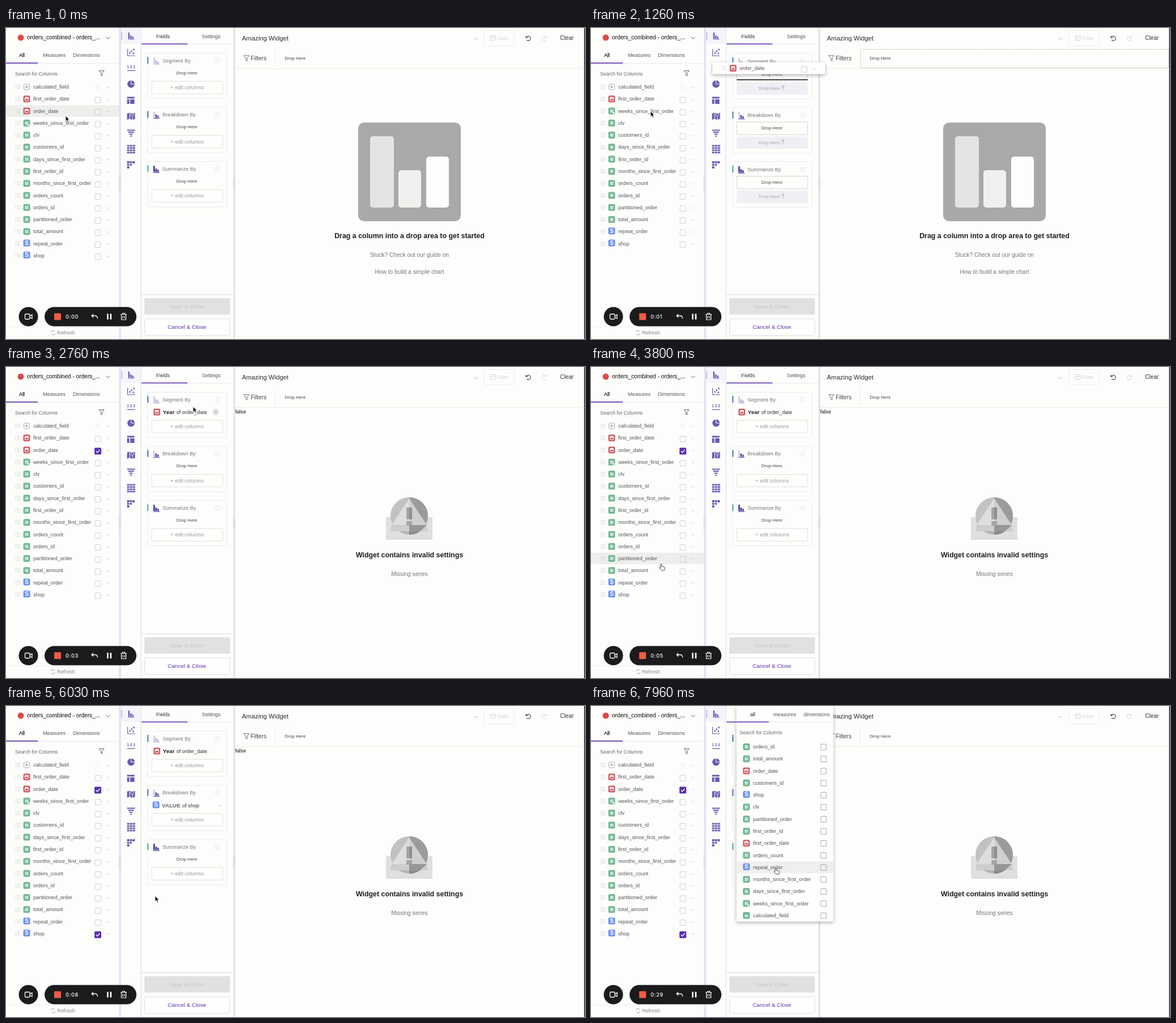
Recreate the animation shown at these times as an HTML page. Size 1021x549 px, loop 8 s.

```html
<!DOCTYPE html>
<html lang="en">
<head>
<meta charset="utf-8">
<title>Widget builder</title>
<style>
  html, body { margin: 0; width: 100%; height: 100%; overflow: hidden; background: #fdfdfb; }
  svg { display: block; width: 100%; height: 100%; font-family: "Liberation Sans", Arial, sans-serif; }
  .float { filter: drop-shadow(0 2px 3px rgba(0, 0, 0, .3)); }
  .timer { font: 500 9.2px Inter, sans-serif; letter-spacing: .6px; }
</style>
</head>
<body>
<svg viewBox="0 0 1021 549">
  <g id="base"></g>
  <g id="live"></g>
</svg>
<script>
const LOOP = 8000, ROW = 21.27, PURPLE = '#5b2fae', ICON = '#6a5bb0';
const DRAG_START = 350, DROP = 1950, SHOP_ADDED = 4930, SHOP_CHECKED = 5130, MENU_OPEN = 6934;
const BLUE = '#6d93f0', GREEN = '#74b897', RED = '#cf616b';

const columns = ['calculated_field', 'first_order_date', 'order_date', 'weeks_since_first_order', 'clv',
  'customers_id', 'days_since_first_order', 'first_order_id', 'months_since_first_order', 'orders_count',
  'orders_id', 'partitioned_order', 'total_amount', 'repeat_order', 'shop'];
const menuColumns = ['orders_id', 'total_amount', 'order_date', 'customers_id', 'shop', 'clv',
  'partitioned_order', 'first_order_id', 'first_order_date', 'orders_count', 'repeat_order',
  'months_since_first_order', 'days_since_first_order', 'weeks_since_first_order', 'calculated_field'];

// Key lists hold [time, x, y]; values ease from one key to the next.
const cursorKeys = [[0, 105, 155], [300, 105, 155], [700, 105, 147], [2529, 105, 147], [2530, 316, 62],
  [2760, 330, 70], [3000, 330, 71], [3560, 130, 290], [3800, 123, 347], [4300, 146, 392], [4700, 160, 402],
  [5580, 160, 402], [6360, 327, 294], [7299, 327, 294], [7300, 325, 285]];
const dragKeys = [[DRAG_START, 0, 0], [1100, 214, -76]];
const clockKeys = [[0, 0], [770, 1], [1700, 2], [2460, 3], [3200, 4], [3700, 5], [4300, 6], [4900, 7], [6000, 8], [7300, 29]];

const clamp = v => Math.max(0, Math.min(1, v));
const mix = (a, b, p) => a + (b - a) * p;

function track(keys, t) {
  const next = keys.findIndex(k => k[0] > t);
  if (next < 0) return keys.at(-1).slice(1);
  if (!next) return keys[0].slice(1);
  const [a, b] = [keys[next - 1], keys[next]];
  const p = (t - a[0]) / (b[0] - a[0]), s = p * p * (3 - 2 * p);
  return [mix(a[1], b[1], s), mix(a[2], b[2], s)];
}

// Drawing helpers; text is placed by its vertical centre.
const text = (x, y, s, size = 9.1, fill = '#55555a', extra = '') =>
  `<text x="${x}" y="${y + size * .34}" font-size="${size}" fill="${fill}" ${extra}>${s}</text>`;
const mid = (x, y, s, size, fill, extra = '') => text(x, y, s, size, fill, 'text-anchor="middle" ' + extra);
const rect = (x, y, w, h, fill, r = 0, extra = '') =>
  `<rect x="${x}" y="${y}" width="${w}" height="${h}" rx="${r}" fill="${fill}" ${extra}/>`;
const frame = (x, y, w, h, stroke, r = 2, fill = 'none', extra = '') =>
  rect(x, y, w, h, fill, r, `stroke="${stroke}" ${extra}`);
const path = (d, stroke, width = 1, fill = 'none', extra = '') =>
  `<path d="${d}" stroke="${stroke}" stroke-width="${width}" fill="${fill}" ${extra}/>`;
const shape = (d, fill) => path(d, 'none', 0, fill);
const dot = (x, y, r, fill, extra = '') => `<circle cx="${x}" cy="${y}" r="${r}" fill="${fill}" ${extra}/>`;
const group = (x, y, body, extra = '') => `<g transform="translate(${x} ${y})" ${extra}>${body}</g>`;
const chevron = (x, y, color, s = 2.5) => path(`M${x - s} ${y - s / 2}l${s} ${s}l${s} ${-s}`, color);
const funnel = (x, y, s, color) =>
  path(`M${x - s} ${y - s}h${2 * s}l${-s * .75} ${s * .9}v${s * 1.1}l${-s * .5} ${-s * .3}v${-s * .8}z`, color, .9);
const bold = 'font-weight="bold"';

function typeIcon(x, y, name) {
  const box = color => rect(x - 6, y - 6, 12, 12, color, 2.5);
  if (name.endsWith('_date')) return box(RED) +
    frame(x - 3, y - 3, 6, 6, '#fff', 1) + rect(x - 3, y - 2.5, 6, 2, '#fff');
  if (/^(shop|repeat_order)$/.test(name)) return group(0, -1, box(BLUE) + mid(x, y, 'S', 10, '#fff', bold));
  if (name === 'calculated_field') return box(GREEN) + mid(x, y, 'N', 8, '#fff', bold);
  return box(GREEN) + path(`M${x - 1.3} ${y - 3}v6m2.6 -6v6M${x - 3} ${y - 1.3}h6m-6 2.6h6`, '#fff', .9) +
    (name.startsWith('weeks') ? rect(x + 2, y + 2, 3, 3, '#fff', 1) : '');
}

function checkbox(x, y, checked) {
  return checked
    ? rect(x - 6, y - 6, 12, 12, PURPLE, 1.5) + path(`M${x - 3.3} ${y}l2.4 2.5l4.4 -5`, '#fff', 1.3)
    : frame(x - 5, y - 5, 10, 10, '#cfcfd2', 1);
}

function listRow(name, y, checked) {
  const calculated = name === 'calculated_field';
  return path(`M16 ${y - 3}h2m1 0h6M16 ${y}h2m1 0h6M16 ${y + 3}h2m1 0h6`, '#d2d2d8', .9) +
    (calculated
      ? frame(31.5, y - 5, 10, 10, '#aaaab4', 2) + path(`M34 ${y}h5m-2.5 -2.5v5`, '#8d8d99') +
        dot(162, y, 3.5, 'none', 'stroke="#ececee"')
      : typeIcon(36.5, y, name) + checkbox(162, y + 2, checked)) +
    text(48, y, name) + chevron(180, y + 1, '#cfcfd3');
}

const bars = (x, y, colors) => rect(x - 5, y - 6, 2.4, 11, colors[0]) + rect(x - 1.6, y - 1, 2.4, 6, colors[1]) +
  rect(x + 1.8, y + 1, 2.4, 4, colors[1]) + rect(x - 5, y + 5.5, 11, 1, colors[1]);

function chartIcons() {
  const x = 220.5;
  return rect(204, 0, 33, 28, '#f5f4fb') + rect(203, 7, 2, 14, '#c9c4ea') +
    bars(x, 14, [ICON, ICON]) +
    path(`M${x - 6} 37v12h13`, ICON, 1.2) + [[-2, 44], [1, 41], [4, 45], [5, 38]].map(([d, y]) => dot(x + d, y, 1.4, ICON)).join('') +
    mid(x, 69, '1 2 3', 6.5, ICON, bold) + rect(x - 7, 74.5, 14, 1.3, ICON) +
    dot(x, 99, 6.5, ICON) + path(`M${x} 92v7h7`, '#fdfdfb') +
    rect(x - 7, 121.5, 13, 3, ICON) + rect(x - 7, 126, 4, 8, ICON) + rect(x - 1.5, 126, 7.5, 8, ICON) +
    shape(`M${x - 7} 151l4 -1.5v11l-4 1.5zM${x - 2} 149.5l4 2v10.5l-4 -1.5zM${x + 3} 151.5l4 -2v11l-4 1.5z`, ICON) +
    dot(x + 2, 153, 2.6, ICON, 'stroke="#fdfdfb" stroke-width=".8"') +
    [[7, 179.5], [5, 183], [3, 186.5], [1.3, 190]].map(([w, y]) => rect(x - w, y, 2 * w, 2, ICON)).join('') +
    [207, 211, 215, 219].map(y => rect(x - 7, y - .5, 4, 2.8, ICON) + rect(x - 2.2, y - .5, 4.2, 2.8, ICON) + rect(x + 2.8, y - .5, 4.4, 2.8, ICON)).join('') +
    rect(x - 7, 235, 4, 4, ICON) + rect(x - 2, 235, 3.5, 4, ICON) + rect(x + 2.5, 235, 4, 4, ICON) +
    rect(x - 7, 240, 4, 3, ICON) + rect(x - 2, 240, 3.5, 3, ICON) + rect(x - 7, 244, 4, 4, ICON);
}

const undo = (x, y, color, s = 1) =>
  path('M-4 -4v3.2h3.2M-3.6 -1.2a4 4 0 1 1 .6 4.2', color, 1.2, 'none', `transform="translate(${x} ${y}) scale(${s} 1)"`);

function recorder() {
  return dot(39.5, 509.5, 17, '#1b1b1d') +
    frame(33.5, 505, 8.5, 9, '#fff', 1.5, 'none', 'stroke-width="1.3"') + path('M42 508.5l4 -2.5v7l-4 -2.5', '#fff', 1.2) +
    rect(68, 492.5, 162, 34, '#1b1b1d', 17) + rect(85, 503.5, 12, 12, '#f05c45', 1) +
    path('M154 505l-3 3l3.2 3M151 508h7q3.5 .5 3.5 5', '#fff', 1.3) +
    rect(178, 504.5, 2.6, 10, '#fff') + rect(183.5, 504.5, 2.6, 10, '#fff') +
    path('M202 505.5h11m-7.5 0v-2h4v2M203.5 506v9h8v-9M206 508.5v4m3 -4v4', '#fff', 1.2);
}

function baseScene() {
  const line = '#e9e9ee';
  return rect(0, 0, 1021, 549, '#fdfdfb') +
    // column list header and footer
    dot(26, 17, 5.5, '#dd4b4b') + text(37, 17, 'orders_combined - orders_...', 10.05, '#333', 'stroke="#333" stroke-width=".2"') +
    chevron(180, 17.5, '#555', 3.5) +
    mid(28, 48, 'All', 9.1, '#222', 'stroke="#222" stroke-width=".25"') + text(65, 48, 'Measures') + text(118, 48, 'Dimensions') +
    rect(0, 62, 200, 1, line) + rect(0, 61, 56, 1.6, PURPLE) +
    text(16, 81.5, 'Search for Columns', 8.5, '#66666b') + funnel(168.5, 80, 4.5, '#555') +
    rect(0, 527, 200, 1, '#f0f0f0') + text(90, 538, 'Refresh', 9.1, '#88888d') +
    path('M79.5 537a3.5 3.5 0 0 1 6.5 -1M86.500 539a3.500 3.500 0 0 1 -6.500 1', '#99999e') +
    // dividers
    rect(199, 0, 4, 549, '#e5e3f3') + rect(237, 0, 2, 549, '#ececf1') + rect(401, 0, 3, 549, '#e3e3e3') +
    [200, 402].map(x => path(`M${x - 1} 264v22m3 -22v22`, '#cfcfd6', .7)).join('') +
    rect(1019.5, 0, 1.5, 549, '#222') +
    chartIcons() +
    // field panel
    mid(277, 14.5, 'Fields', 9.1, '#333') + mid(362, 14.5, 'Settings') +
    rect(239, 28, 162, 1, line) + rect(239, 27.500, 81, 1.500, PURPLE) +
    rect(238, 470, 163, 1.5, '#e6e6ea') +
    rect(244, 477, 151, 29, '#e1e1e1', 2) + mid(319, 492, 'Save &amp; Close', 9.9, '#c5c5c5') +
    frame(244.5, 513.5, 150, 29, '#dedee0', 2, '#fefefe') + mid(319, 528, 'Cancel &amp; Close', 9.9, PURPLE) +
    // widget header
    text(416, 18, 'Amazing Widget', 11.3, '#2a2a2a') + chevron(828, 19, '#bbb', 3.5) +
    frame(842.5, 4.5, 54, 27, '#ededed', 2) + frame(854, 13.5, 9, 8, '#d6d6d6', 1) + path('M854 16.5h9', '#d6d6d6') +
    text(866, 18, 'Date', 9.5, '#d8d8d8') +
    undo(921, 18, '#555') + undo(949, 18, '#ddd', -1) + text(977, 18, 'Clear', 10.1, '#333') +
    funnel(424, 53.5, 4.8, '#666') + text(431.5, 53.5, 'Filters', 10.2, '#444') +
    rect(404, 71, 616, 1, '#ebebe6') +
    recorder();
}

function section(i, title, accent, colors, chip, dragging, hover) {
  const y = 44 + 95.6 * i, shift = dragging ? 1 : 0, dash = 'stroke-dasharray="2 1.3"';
  let body = frame(249.5, y + .5, 140, 80 + shift, '#ebebf0') +
    rect(249, y + 7 + shift, 2.3, 12, accent) + bars(265, y + 14 + shift, colors) +
    text(276, y + 13.5 + shift, title, 9.1, '#77777d') + dot(373, y + 13.5 + shift, 4, 'none', 'stroke="#e8e6f1"') +
    rect(372.6, y + 12, 1, 4, '#e8e6f1');
  if (dragging) return body +
    frame(257, y + 26.5, 125, 22, '#b9b9b2', 1, 'none', dash) + mid(319, y + 37, 'Drop Here', 8, '#444') +
    rect(257, y + 52, 125, 21.5, '#efeff4') + text(296, y + 62.4, 'Drop Here', 8, '#a3a3ab') +
    path(`M338.500 ${y + 66}v-7m-2.500 2.500l2.500 -2.500l2.500 2.500M335.500 ${y + 58}h6`, '#a3a3ab', .8);
  return body + (chip || mid(319, y + 35, 'Drop Here', 8, '#444')) +
    frame(257, y + 50, 125, 22, '#deded8', 2, hover ? '#ebebf0' : '#fefefd') +
    mid(319.5, y + 61, '+ edit columns', 9.1, '#99999c');
}

function emptyState() {
  return rect(621, 167, 181, 174, '#a9a9a9', 10) + rect(642, 191, 42, 126, '#e4e4e4', 5) +
    rect(692, 251, 40, 66, '#f0f0ee', 5) + rect(741, 227, 40, 90, '#fdfdfb', 5) +
    mid(711.5, 367, 'Drag a column into a drop area to get started', 12.42, '#1d1d1f', bold) +
    mid(711.5, 401, 'Stuck? Check out our guide on', 10.17, '#77777a') +
    mid(711.5, 431, 'How to build a simple chart', 10.17, '#77777a');
}

function invalidState() {
  return text(404, 79, 'false', 9.1, '#111') + rect(670, 265, 82, 40, '#dfdfdf') +
    dot(711, 263, 33, '#c2c2c2') + shape('M711 230a33 33 0 0 1 0 66z', '#9b9b9b') +
    shape('M711 232L680 279H711z', '#dedede') + shape('M711 232L742 279H711z', '#cfcfcf') +
    shape('M680 279L711 279V295Q695 294 687 286z', '#b3b3b3') + shape('M711 279H742L740 279Q731 295 711 296z', '#8a8a8a') +
    shape('M680 279h62l2 11h-66z', '#cdcdcd') + shape('M711 279h31l-13 12h-18z', '#969696') +
    rect(706, 248, 10, 21, '#a5a5a5', 1) + rect(711, 248, 5, 21, '#8f8f8f') + rect(706, 272, 10, 8, '#a5a5a5', 1) +
    mid(711.5, 331.5, 'Widget contains invalid settings', 12.4, '#1d1d1f', bold) +
    mid(711.5, 365.5, 'Missing series', 10.2, '#77777a');
}

function menu(t, cursorY) {
  const p = clamp((t - MENU_OPEN) / 120), eased = 1 - (1 - p) ** 2, scale = .8 + .2 * eased;
  const hovered = Math.round((cursorY - 72) / ROW);
  const rows = menuColumns.map((name, i) => {
    const y = 72 + i * ROW;
    return (i === hovered ? rect(256.5, y - 10.6, 171, ROW, '#efefed') : '') + typeIcon(274, y, name) +
      text(285.7, y, name) + frame(405, y - 4.7, 10, 10, '#a5a5b4', 1);
  }).join('');
  return `<g opacity="${eased}" transform="translate(256 380) scale(${scale}) translate(-256 -380)">` +
    `<g class="float">${rect(256.5, -1, 171, 381.5, '#fefefc', 2)}</g>` +
    rect(256.5, 28, 171, 1, '#ebebee') + rect(256.5, 27.5, 57, 1.5, PURPLE) +
    mid(285, 14.5, 'all', 9.1, '#222') + mid(341.5, 14.5, 'measures') + mid(398, 14.5, 'dimensions') +
    text(262, 47.5, 'Search for Columns', 8.5, '#66666b') + rows + '</g>';
}

const arrow = (x, y) => path(`M${x} ${y}v9.500l2.300 -2l1.700 3.700l1.700 -.8l-1.700 -3.500h3z`, '#fff', .7, '#111');
const hand = (x, y) => group(x, y, path('M1.500 1.200q1.300 -1.200 2 .3v3.500l5 1.200q1.200 .6 .8 2.500l-1 3.300h-5l-3.800 -4.500q0 -1.500 2 -.2z', '#333', .9, '#fff'));

function liveScene(t) {
  const [cx, cy] = track(cursorKeys, t);
  const dragging = t >= DRAG_START && t < DROP, dropped = t >= DROP;
  const overList = cx < 200 && (t < DRAG_START || t > 2600);
  const collapse = dragging ? clamp((t - DRAG_START) / 120) : 0;
  let out = '';

  columns.forEach((name, i) => {
    const y = 104 + ROW * i - (i > 2 ? ROW * collapse : 0);
    if (dragging && i === 2) return;
    if (overList && Math.abs(cy - y) <= ROW / 2) out += rect(0, y - 10.2, 199, 20.5, '#eeeeec');
    out += listRow(name, y, (i === 2 && dropped) || (i === 14 && t >= SHOP_CHECKED));
  });

  if (t >= SHOP_ADDED - 50 && t < 5200) {
    const grow = clamp((t - SHOP_ADDED + 50) / 130), fade = 1 - clamp((t - SHOP_CHECKED) / 70);
    out += dot(162, 404, 14 * grow, '#8f7fb8', `opacity="${.4 * fade}"`);
  }

  const overChip = cx > 250 && cx < 390 && cy > 66 && cy < 92;
  const dateChip = dropped && typeIcon(266, 79.5, 'order_date') + text(276.5, 79.5, 'Year', 9.8, '#222', bold) +
    text(300.5, 80, 'of order_date', 9.1, '#333') +
    (overChip ? dot(370, 79.5, 6, '#e6e6ea') + path('M368 77.5l4 4m0 -4l-4 4', '#9a9aa2') : '');
  const shopChip = t >= SHOP_ADDED && typeIcon(264.5, 175.5, 'shop') + text(275, 175.5, 'VALUE', 9.8, '#66666b', bold) +
    text(311, 176, 'of shop', 9.1, '#333') + chevron(377, 176, '#ccc');
  const overEdit = cx > 257 && cx < 382 && cy > 285 && cy < 308;
  out += section(0, 'Segment By', '#5c86c6', ['#c9c4ea', '#b3add9'], dateChip, dragging) +
    section(1, 'Breakdown By', '#5c86c6', ['#c9c4ea', '#4b3f9c'], shopChip, dragging) +
    section(2, 'Summarize By', '#5fb597', ['#33278f', '#33278f'], '', dragging, overEdit);

  out += dragging
    ? frame(475.5, 37.5, 543, 33, '#bdbdb4', 0, 'none', 'stroke-dasharray="2 1.3"')
    : path('M474.5 39v29', '#dcdce4', 1, 'none', 'stroke-dasharray="1 1"');
  out += text(491.5, 53.5, 'Drop Here', 8, '#444') + (dropped ? invalidState() : emptyState());

  if (dragging) {
    const [dx, dy] = track(dragKeys, t);
    if (t > 950) out += rect(257, 90.5, 125, 1.6, '#222');
    out += group(dx, dy, `<g class="float">${rect(0, 136.5, 199, 21, '#fefefe', 2)}</g>` + listRow('order_date', 147, false));
  }
  if (t >= MENU_OPEN) out += menu(t, cy);

  const seconds = clockKeys.findLast(k => k[0] <= t)[1];
  out += `<text class="timer" x="105" y="513" fill="#fff">0:${String(seconds).padStart(2, '0')}</text>`;
  const pointing = (t > 3000 && cx < 200) || t > 6250;
  return out + (pointing ? hand(cx - 2, cy) : arrow(cx, cy));
}

const live = document.getElementById('live');
document.getElementById('base').innerHTML = baseScene();
function draw() {
  live.innerHTML = liveScene(performance.now() % LOOP);
  requestAnimationFrame(draw);
}
draw();
</script>
</body>
</html>
```
